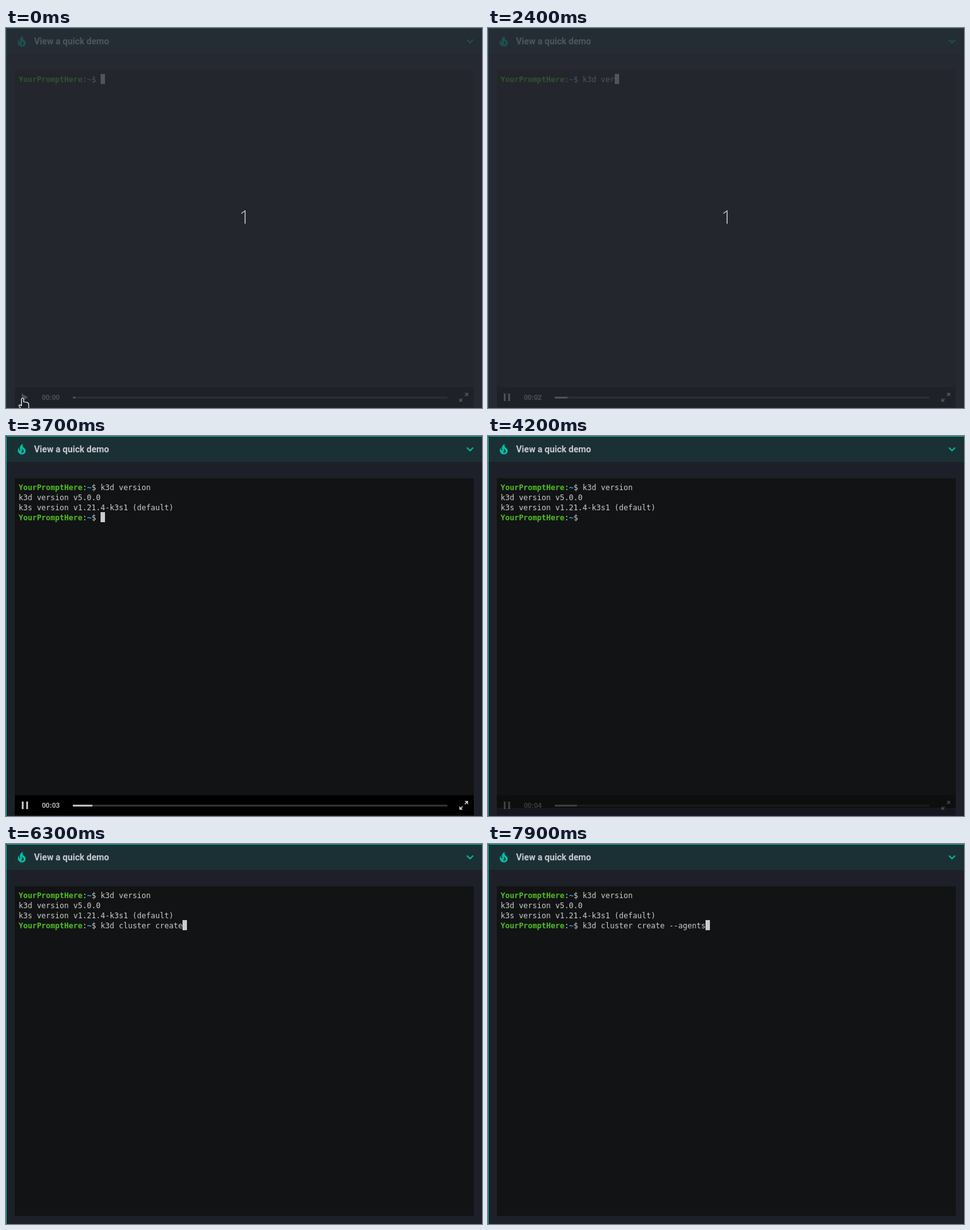
Animation of 755x604 px, one loop 8000 ms. Source, as an HTML page:

```html
<!DOCTYPE html>
<html lang="en">
<head>
<meta charset="utf-8">
<title>Quick demo</title>
<style>
  html, body { margin: 0; width: 100%; height: 100%; overflow: hidden; background: #1e2029; }
  #stage { position: absolute; left: 0; top: 0; width: 755px; height: 604px; overflow: hidden; }
  #stage div, svg { position: absolute; }
  #panel { left: 0; top: 0; width: 760px; height: 610px; box-sizing: border-box;
    border: 1px solid #00bfa5; border-radius: 2.2px; overflow: hidden; }
  #head { left: 0; top: 0; width: 100%; height: 40px; background: #1b3035; }
  #title { left: 44.4px; top: 11px; font: 700 14.08px/20px Roboto, sans-serif; color: #c8cbd0; white-space: pre; }
  #term { left: 14px; top: 67px; width: 728px; height: 524px; background: #121314; }
  #rows { left: 6px; top: 7px; font: 12px/16px "DejaVu Sans Mono", monospace; color: #ccc; white-space: pre; }
  #rows div { left: 0; height: 16px; }
  #rows b { color: #4ebf22; }
  #rows b + b { color: #26b0d7; }
  #rows i { position: relative; top: -1px; display: inline-block; width: 1ch; height: 16px;
    vertical-align: top; background: #ccc; }
  #bar { left: 14px; top: 571px; width: 728px; height: 32px; background: #000; }
  #clock { left: 43px; top: 8px; font: bold 11px/16px "Liberation Sans", Arial, sans-serif; color: #bbb; }
  #track { left: 92px; top: 15px; width: 594px; height: 3px; background: #333; }
  #fill { left: 0; top: 0; height: 3px; background: #bbb; }
  #shade { left: 0; top: 0; width: 755px; height: 604px; background: rgba(40, 44, 52, .75); }
  #count { left: 1px; top: 278px; width: 755px; text-align: center; color: #cdd0d4;
    font: 300 30px/44px "Open Sans", "Noto Sans", sans-serif; }
</style>
</head>
<body>
<div id="stage">
  <div id="panel"><div id="head"></div></div>
  <svg style="left:14.2px;top:10px" width="22" height="22" viewBox="0 0 24 24" fill="#00bfa5">
    <path d="M17.55 11.2c-.23-.3-.5-.56-.76-.82-.65-.6-1.4-1.03-2.03-1.66C13.3 7.26 13 4.85 13.91 3c-2.8.7-5.2 3.6-5.2 7.2 0 1.2.5 2.4.5 3.3 0 .5-.7.8-1.1.4C6.9 12.4 6.7 10.3 7.45 8.7 5.9 10 5 12.3 5.14 14.47c.3 3.6 3 6 5.83 6.45 2.1.27 4.35-.12 5.96-1.6 2.3-2.2 2.7-5.6.62-8.12m-3.1 6.3c-1.2 1-2.8.8-3.95-.22 1.19-.28 1.89-1.16 2.09-2.05.3-1.5-.8-2.6-.09-4.29.8 1.7 2.4 1.9 2.8 3.86.2 1-.2 2.1-.85 2.7z"/>
  </svg>
  <div id="title">View a quick demo</div>
  <svg style="left:725px;top:10px" width="22" height="22" viewBox="0 0 24 24" fill="#00bfa5">
    <path d="M7.41 8.58 12 13.17l4.59-4.59L18 10l-6 6-6-6z"/>
  </svg>

  <div id="term"><div id="rows"></div></div>

  <div id="bar">
    <svg style="left:10px;top:10px" width="12" height="12" fill="#bbb"><path id="toggle"/></svg>
    <div id="clock"></div>
    <div id="track"><div id="fill"></div></div>
    <svg style="left:705px;top:9px" width="14" height="14" viewBox="0 0 12 12" fill="#bbb">
      <path d="M12 0H7l2 2-2 2 1 1 2-2 2 2zM0 12V7l2 2 2-2 1 1-2 2 2 2z"/>
    </svg>
  </div>

  <div id="shade"><div id="count">1</div></div>
  <svg id="hand" style="left:19px;top:587px" width="20" height="22" viewBox="0 0 20 22">
    <path d="M5.5 13V3.2q0-1.7 1.8-1.7T9.1 3.2v4.3q7.9 0 7.9 3.5v5q0 3-2 5.5H7.5L2 14.5q-1-1.8.5-2.4 1.4-.4 3 1.4z"
      fill="#1b1d22" stroke="#fff" stroke-width="1.2" stroke-linejoin="round"/>
  </svg>
</div>
<script>
const LOOP = 8000, STEP = 100, BLINK = 500;
const START = 700, ENTER = 3200, PRINTED = 3300, READY = 3400;
const PLAY = 'M1 0 11 6 1 12z', PAUSE = 'M1 0h3v12H1zM8 0h3v12H8z';
const PROMPT = '<b>YourPromptHere</b>:<b>~</b>$ ';
const OUTPUT = ['k3d version v5.0.0', 'k3s version v1.21.4-k3s1 (default)'];

// Each burst types its text evenly between two times
const first = [{ from: 1900, to: 2800, text: 'k3d version' }];
const second = [
  { from: 4600, to: 5800, text: 'k3d cluster c' },
  { from: 6000, to: 6300, text: 'reate' },
  { from: 6500, to: 6700, text: ' -' },
  { from: 7200, to: 7200, text: '-' },
  { from: 7500, to: 7900, text: 'agents' },
];

const el = id => document.getElementById(id);
const clamp = x => Math.min(1, Math.max(0, x));
let shown = '';

const typed = (bursts, t) => bursts.map(({ from, to, text }) => {
  const part = clamp((t - from + STEP) / (to - from + STEP));
  return text.slice(0, Math.round(part * text.length));
}).join('');

// The cursor blinks once the terminal has been idle for a while
function cursorOn(t) {
  const active = [...first, ...second].filter(b => t >= b.from).map(b => Math.min(t, b.to));
  if (t >= PRINTED) active.push(PRINTED);
  const idle = Math.max(0, t - Math.max(START, ...active));
  return Math.floor(idle / BLINK) % 2 === 0;
}

function lines(t) {
  const rows = [PROMPT + typed(first, t)];
  if (t >= PRINTED) rows.push(...OUTPUT);
  if (t >= ENTER) rows.push(t >= READY ? PROMPT + typed(second, t) : '');
  if (cursorOn(t)) rows[rows.length - 1] += '<i></i>';
  return rows.map((r, i) => `<div style="top:${i * 16}px">${r}</div>`).join('');
}

function draw(t) {
  const html = lines(t);
  if (html !== shown) el('rows').innerHTML = shown = html;
  el('toggle').setAttribute('d', t < 500 ? PLAY : PAUSE);
  el('clock').textContent = '00:0' + Math.floor(t / 1000);
  el('fill').style.width = (t < START ? 4 : Math.floor(t * .0084)) + 'px';
  el('bar').style.opacity = clamp((4300 - t) / 400);
  el('shade').style.display = t < 2500 ? '' : 'none';
  el('hand').style.transform = `translateY(${t < START ? 0 : (t - 600) / 10}px)`;
}

const start = performance.now();
function tick() {
  const t = (performance.now() - start) % LOOP;
  draw(Math.floor(t / STEP) * STEP);
  requestAnimationFrame(tick);
}
tick();
</script>
</body>
</html>
```
